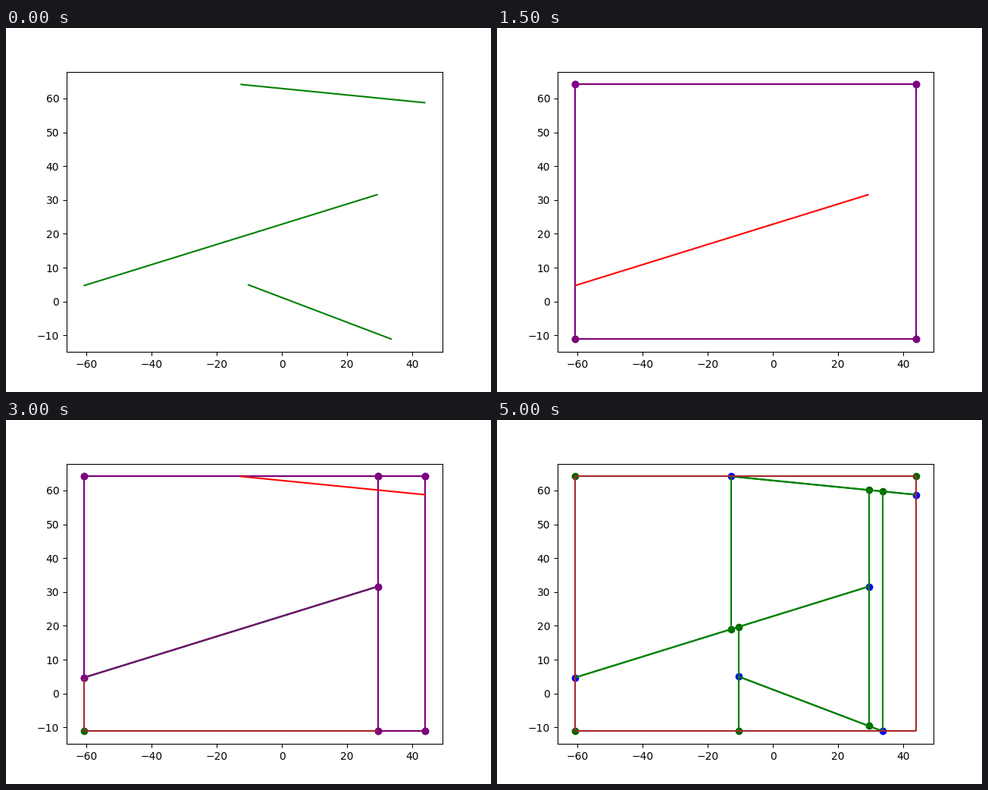
Recreate the animation shown at these times as a matplotlib script. Size 640 px wide and 480 px high, loop 5500 ms.

```python
import matplotlib.pyplot as plt
from matplotlib.animation import FuncAnimation
from matplotlib.collections import LineCollection

X0, X1, Y0, Y1 = -60.83, 44.04, -11.14, 64.15
BL, BR, TL, TR = (X0, Y0), (X1, Y0), (X0, Y1), (X1, Y1)

# Segments in order of insertion
A, B = (X0, 4.68), (29.42, 31.62)
C, D = (-12.74, Y1), (X1, 58.73)
E, F = (-10.49, 5.0), (33.70, Y0)
S1, S2, S3 = SEGMENTS = [(A, B), (C, D), (E, F)]


def at(seg, x):
    """Point of a segment's line at the given x."""
    (xa, ya), (xb, yb) = seg
    return x, ya + (yb - ya) * (x - xa) / (xb - xa)


def edges(poly):
    return list(zip(poly, poly[1:] + poly[:1]))


TOP, BOTTOM = (TL, TR), (BL, BR)
SIDES = [(BL, TL), (BR, TR)]
B_TOP, B_LOW = (B[0], Y1), (B[0], Y0)
B_S2, B_S3 = at(S2, B[0]), at(S3, B[0])
C_S1, E_S1, F_S2 = at(S1, C[0]), at(S1, E[0]), at(S2, F[0])
E_LOW = (E[0], Y0)

# Trapezoid map after each insertion; edges shared by two cells are drawn twice
MAPS = [
    dict(walls=[], frame=[TOP, BOTTOM] + SIDES,
         corners=[BL, BR], ends=[TL, TR]),
    dict(walls=[S1, S1, (B_LOW, B_TOP)],
         frame=[TOP, BOTTOM] * 2 + SIDES,
         corners=[TL, B_TOP, BL, B_LOW, BR], ends=[A, B, TR]),
    dict(walls=[S1, S1, S2, S2, (C_S1, C), (B_LOW, B_S2)],
         frame=[TOP, BOTTOM] * 2 + SIDES,
         corners=[TL, TR, C_S1, B_S2, BL, B_LOW, BR], ends=[A, B, C, D]),
    dict(walls=[S1, S1, S2, S2, S3, S3, (C_S1, C), (E_LOW, E_S1),
                (E_LOW, E), (B_S3, B_S2), (F, F_S2)],
         frame=[TOP, TOP, BOTTOM] + SIDES,
         corners=[TL, TR, C_S1, E_S1, B_S2, F_S2, B_S3, BL, E_LOW],
         ends=[A, B, C, D, E, F]),
]

# Cells crossed by each new segment
CROSSED = [
    [[TL, TR, BR, BL]],
    [[TL, B_TOP, B, A], [B_TOP, TR, BR, B_LOW]],
    [[A, B, B_LOW, BL], [B_S2, D, BR, B_LOW]],
]

fig, ax = plt.subplots(figsize=(6.4, 4.8), dpi=100)


def lines(segs, color):
    ax.add_collection(LineCollection(segs, colors=color))


def dots(points, color):
    ax.scatter(*zip(*points), color=color)


def draw_map(walls, frame, corners, ends):
    dots(corners, "darkgreen")
    dots(ends, "blue")
    lines(walls, "green")
    lines(frame, "brown")


def update(step):
    ax.clear()
    ax.set_xlim(-66.07, 49.28)
    ax.set_ylim(-14.90, 67.91)
    if step == 0:
        lines(SEGMENTS, "green")
        return
    # Three phases per segment: map, candidate, crossed cells
    n, phase = divmod(step - 1, 3)
    draw_map(**MAPS[n])
    if phase == 1:
        lines([SEGMENTS[n]], "C0")
    elif phase == 2:
        for cell in CROSSED[n]:
            dots(cell, "purple")
            lines(edges(cell), "purple")
        lines([SEGMENTS[n]], "red")


anim = FuncAnimation(fig, update, frames=11, interval=500,
                     repeat=True, repeat_delay=0, blit=False)
plt.show()
```
